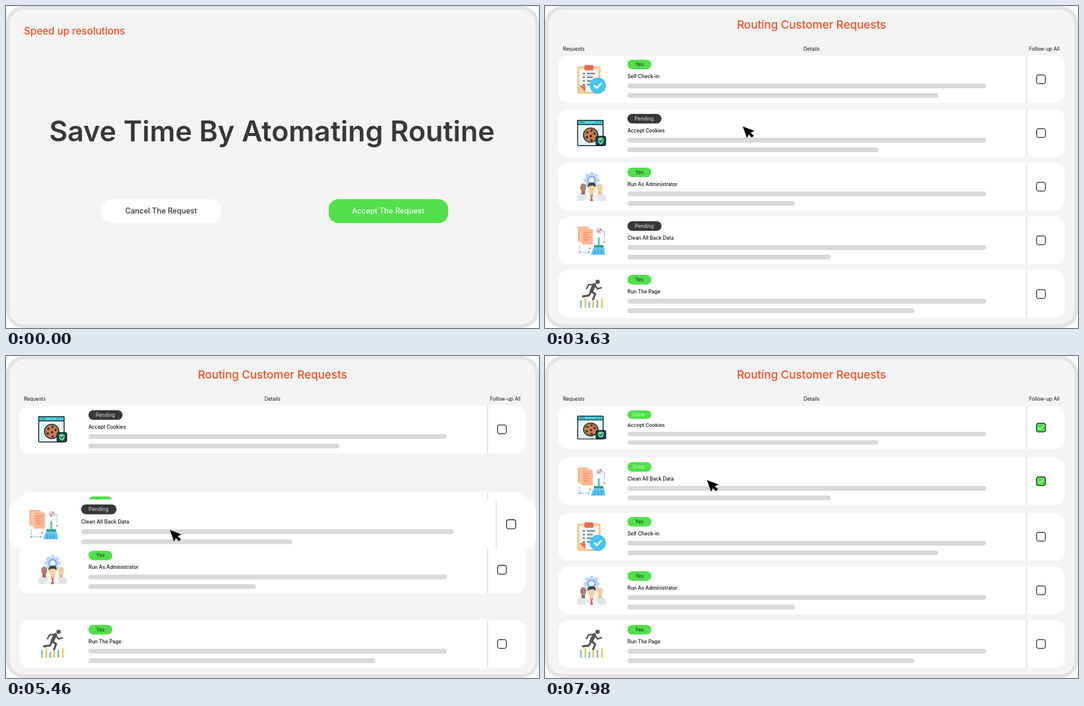
Recreate the animation shown at these times as an HTML page. Size 892 by 540 pixels, loop 8 s.

```html
<!DOCTYPE html>
<html lang="en">
<head>
<meta charset="utf-8">
<title>Routing requests</title>
<style>
html, body { margin: 0; width: 100%; height: 100%; overflow: hidden; background: #fff; }
svg { display: block; width: 892px; height: 540px; font-family: Inter, "Open Sans", sans-serif; }
.mid { text-anchor: middle; }
.small { font-size: 8.3px; fill: #111; }
.orange { fill: #f04e23; font-weight: 500; }
.line { fill: none; stroke-linecap: round; stroke-linejoin: round; }
</style>
</head>
<body>
<svg viewBox="0 0 892 540">
  <rect x="3" y="3" width="886" height="534" rx="27" fill="#f4f4f4" stroke="#e4e4e4" stroke-width="6"/>
  <g id="intro">
    <text x="30" y="48" font-size="16.75" class="orange">Speed up resolutions</text>
    <text x="445" y="227" font-size="47.5" font-weight="600" fill="#38383a" class="mid">Save Time By Atomating Routine</text>
    <rect x="160" y="324" width="200" height="40" rx="16" fill="#fff"/>
    <text x="259.5" y="348" font-size="12.5" font-weight="500" fill="#333" class="mid">Cancel The Request</text>
    <g id="acceptButton">
      <rect x="540" y="324" width="200" height="40" rx="16" fill="#52df4b"/>
      <text x="639.5" y="348" font-size="12.5" font-weight="500" fill="#f0fff0" class="mid">Accept The Request</text>
    </g>
  </g>
  <g id="board">
    <text x="446" y="38" font-size="18.8" class="orange mid">Routing Customer Requests</text>
    <text x="30" y="75" class="small">Requests</text>
    <text x="446" y="75" class="small mid">Details</text>
    <text x="861" y="75" class="small" text-anchor="end">Follow-up All</text>
    <g id="rows"></g>
  </g>
  <path id="cursor" d="M0 0L19.5 7.5 13 10.5 18.5 15.5 15 18.8 10 13.5 7 19.5Z"/>
</svg>
<script>
const $ = id => document.getElementById(id);
const LOOP = 8000, GREEN = [82, 223, 75], DARK = [56, 56, 58];

const rect = (x, y, w, h, fill, rx = 0, more = '') =>
  `<rect x="${x}" y="${y}" width="${w}" height="${h}" rx="${rx}" fill="${fill}" ${more}/>`;
const dot = (x, y, r, fill, more = '') => `<circle cx="${x}" cy="${y}" r="${r}" fill="${fill}" ${more}/>`;
const oval = (x, y, rx, ry, fill) => `<ellipse cx="${x}" cy="${y}" rx="${rx}" ry="${ry}" fill="${fill}"/>`;
const shape = (d, fill) => `<path d="${d}" fill="${fill}"/>`;
const line = (d, color, w, more = '') =>
  `<path class="line" d="${d}" stroke="${color}" stroke-width="${w}" ${more}/>`;
const repeat = (n, draw) => Array.from({ length: n }, (_, i) => draw(i)).join('');

const icons = {
  cookie: () => {
    const edge = 'stroke="#111c22" stroke-width="1.5"';
    return rect(54.7, 18.7, 42.6, 42.6, '#e2fbfd', 1.5, edge) +
      rect(54.7, 18.7, 42.6, 7, '#4fd4da', 1.5, edge) +
      line('M58 22.2H66', '#176a75', 1.3) + repeat(3, i => dot(85 + i * 4, 22.2, 1, '#176a75')) +
      dot(76.5, 43.5, 12, '#c87d50', edge) +
      [[71, 39], [78, 36], [70, 47], [77, 45], [83, 41], [78, 52]].map(([x, y]) => dot(x, y, 2, '#3b2420')).join('') +
      rect(85.5, 45.5, 16, 15.5, '#17495b', 3, edge) +
      shape('M93.5 47.5L98 49V53Q98 57 93.5 59 89 57 89 53V49Z', '#6fe08b') +
      line('M91.2 53L93 55 96 51.3', '#123', 1.3);
  },
  clipboard: () =>
    rect(54, 18, 39, 46, '#f0cb8d', 3) + rect(57.5, 22, 32, 39, '#f1f3f6') +
    rect(66, 16, 15, 9, '#e96a50', 2) +
    repeat(4, i => rect(63, 29 + i * 6.2, 4, 2.6, '#6f8590', 1) + rect(70, 29 + i * 6.2, i % 2 ? 10 : 14, 2.6, '#7b8c96', 1)) +
    shape('M57.5 50.5H67.5V61Z', '#e96a50') + shape('M57.5 50.5V61H67.5Z', '#f0cb8d') +
    dot(88.5, 50.5, 13.5, '#46c5f0') + line('M83 51L87 54.5 94 47', '#fff', 3),
  team: () =>
    repeat(8, i => rect(75, 15.5, 6, 7, '#bcd8fb', 1, `transform="rotate(${i * 45} 78 29)"`)) +
    dot(78, 29, 10.5, '#bcd8fb') + dot(78, 29, 6, '#e9f3ff', 'stroke="#6ea4ee" stroke-width="2"') +
    shape('M54 64V56Q56 52 64 51 72 52 74 64Z', '#dfe6ea') + shape('M82 64Q84 52 92 51 100 52 102 56V64Z', '#dfe6ea') +
    rect(61, 46, 6, 7, '#9c6c5a') + rect(89, 46, 6, 7, '#e8bd8e') +
    oval(64, 41.5, 5, 7, '#b08070') + oval(92, 41.5, 5, 7, '#f2d0a3') +
    shape('M66 64Q67 55 78 53 89 55 90 64Z', '#f3f4f8') + rect(75, 48, 6, 8, '#eab98a') +
    oval(78, 43.5, 5.8, 8, '#f5cfa4') +
    shape('M71.5 42Q70 33 78 33 86 32 84.5 42 83 37.5 78 38.5 73 38 71.5 42Z', '#444247') +
    shape('M76 55H80L79 58 80.5 64H75.5L77 58Z', '#e4574f'),
  broom: () =>
    rect(55, 17, 17, 25, '#fbb38b', 1) + rect(58, 19, 17, 25, '#fdc5a4', 1) + rect(62, 21, 18, 26, '#fdb892', 1) +
    repeat(4, i => line(`M65 ${27 + i * 4}H${i % 2 ? 73 : 76}`, '#e97c5a', 1)) +
    dot(90.5, 24, 4, '#fff', 'stroke="#8b9bb0" stroke-width="1"') + line('M88.5 24L90 26 94 20.5', '#e4574f', 1.3) +
    line('M95 24H99.5V36M58 49V60H73', '#63aee0', 1, 'stroke-dasharray="3 2"') +
    dot(58, 60, 1.5, '#63aee0') + dot(73, 60, 1.5, '#63aee0') +
    rect(88.5, 35, 3, 14, '#57c5a8', 1) + rect(82, 48, 16, 4.5, '#349d94', 1) +
    shape('M81 53H99L101 64H77Z', '#5cc4f5') + line('M84 57L83 63M89 57V63M94 57L95 63', '#2584c8', 1) +
    line('M75 52V55M73.5 53.5H76.5M99 41V44M97.5 42.5H100.5', '#f0685e', 1),
  runner: () =>
    dot(88, 19.5, 3.6, '#575254') + line('M82.5 24.5L77.5 35', '#575254', 6) +
    line('M82 24L73 24.5 69.5 31M84 26L88 31.5 94 29.5', '#575254', 2.6) +
    line('M78 36L84 40 80.5 49M77 36L73.5 42.5 63.5 44', '#575254', 3.4) +
    [[60, 50], [67.5, 47], [74, 53], [80.5, 51.5], [87.5, 50], [95, 47.5]]
      .map(([x, y], i) => rect(x - 1.3, y, 2.8, 63 - y, i % 2 ? '#f2c353' : '#6fc3d0')).join('')
};

const pillText = (label, x, fill) => `<text x="${x}" y="19" font-size="8.3" class="mid ${label}" fill="${fill}">${label}</text>`;

function makeRow(icon, title, barWidth, pending, lift = 0) {
  const g = document.createElementNS('http://www.w3.org/2000/svg', 'g');
  g.innerHTML = rect(22, 0, 848, 80, '#fff', 17) + rect(805, 0, 2, 80, '#e5e5e5') +
    icons[icon]() + `<g transform="translate(0 ${-lift})">` +
    rect(138, 8, pending ? 57 : 40, 16, `rgb(${pending ? DARK : GREEN})`, 8, 'class="pill"') +
    (pending ? pillText('Pending', 166, '#dedede') + pillText('Done', 157, '#c9f7c4') : pillText('Yes', 158, '#1a2a1a')) +
    `<text x="138" y="39" class="small" font-weight="500">${title}</text>` +
    rect(138, 48, 600, 8, '#d9d9d9', 4) + rect(138, 64, barWidth, 8, '#d9d9d9', 4) + '</g>' +
    '<g class="check">' + rect(-7.4, -7.4, 14.8, 14.8, '#fff', 3.5, 'stroke="#222" stroke-width="1.3"') +
    '<g class="tick">' + rect(-7.4, -7.4, 14.8, 14.8, '#52df4b', 3.5, 'stroke="#222" stroke-width="1.3"') +
    line('M-4.5 .2L-1.5 3 4.5 -3', '#d8fbd3', 1.3) + '</g></g>';
  $('rows').append(g);
  const find = name => g.querySelector('.' + name);
  const parts = { pill: find('pill'), pendingText: find('Pending'), doneText: find('Done'), check: find('check'), tick: find('tick') };

  return (top, { grow = 0, done = 0, squash = 1, pop = 0 } = {}) => {
    const scale = 1 + 0.04 * grow, mark = 1 + 0.6 * pop;
    g.setAttribute('transform', `translate(446 ${top + 40 - 3 * done}) scale(${scale} ${scale * squash}) translate(-446 -40)`);
    parts.check.setAttribute('transform', `translate(830 40) scale(${mark} ${mark / squash})`);
    parts.tick.setAttribute('opacity', done);
    if (!pending) return;
    parts.pill.setAttribute('width', mix(57, 40, done));
    parts.pill.setAttribute('fill', `rgb(${DARK.map((c, i) => mix(c, GREEN[i], done))})`);
    parts.pendingText.setAttribute('opacity', Math.max(0, 1 - 2 * done));
    parts.doneText.setAttribute('opacity', Math.max(0, 2 * done - 1));
  };
}

// Dragged rows come last so that they pass over the others.
const selfRow = makeRow('clipboard', 'Self Check-in', 520, false, 1);
const adminRow = makeRow('team', 'Run As Administrator', 280, false);
const runRow = makeRow('runner', 'Run The Page', 480, false);
const cookieRow = makeRow('cookie', 'Accept Cookies', 420, true);
const cleanRow = makeRow('broom', 'Clean All Back Data', 340, true);

const mix = (a, b, p) => a + (b - a) * p;
const span = (t, from, to) => Math.min(1, Math.max(0, (t - from) / (to - from)));
const inOut = p => p < 0.5 ? 4 * p ** 3 : 1 - 4 * (1 - p) ** 3;
const ease = (t, from, to) => inOut(span(t, from, to));
const pulse = (t, from, to) => Math.sin(Math.PI * span(t, from, to)) ** 2;

function cursorAt(t) {
  if (t < 1860) {
    const p = ease(t, 215, 900);
    return [mix(217, 642, p), mix(545, 358, p)];
  }
  if (t < 3630) {
    const rest = 1 - span(t, 1860, 2715);
    return [mix(330, 642, rest ** 1.47), mix(202, 358, rest ** 1.25)];
  }
  if (t < 4080) return [331, mix(202, 123, ease(t, 3630, 4140))];
  if (t < 5190) {
    const p = ease(t, 4080, 4595);
    return [mix(331, 278, p), mix(124, 399, p)];
  }
  const drag = ease(t, 5190, 5690), settle = ease(t, 5690, 5830);
  return [mix(278, 272, drag) - settle, mix(399, 225, drag) - 17 * settle];
}

function draw(t) {
  $('intro').setAttribute('opacity', 1 - span(t, 1860, 2330));
  $('board').setAttribute('opacity', span(t, 2270, 2655));
  $('acceptButton').setAttribute('transform',
    `translate(640 344) scale(${1 + 0.2 * pulse(t, 1030, 1815)}) translate(-640 -344)`);

  const firstDrag = ease(t, 3630, 4140), secondDrag = ease(t, 5190, 5690);
  const cookieDone = ease(t, 6020, 6610), cleanDone = ease(t, 6990, 7560);
  selfRow(83 + 90 * (firstDrag + secondDrag));
  adminRow(263 + 90 * secondDrag);
  runRow(443);
  cookieRow(173 - 90 * firstDrag, {
    grow: span(t, 3630, 3760) - ease(t, 3920, 4250),
    done: cookieDone, squash: 1 - 0.1 * cookieDone, pop: pulse(t, 6780, 7230)
  });
  cleanRow(353 - 180 * secondDrag, {
    grow: span(t, 5050, 5180) - ease(t, 5480, 5815),
    done: cleanDone, pop: pulse(t, 7560, 7990)
  });

  const [x, y] = cursorAt(t);
  const press = pulse(t, 780, 1380) + pulse(t, 2840, 3430) + pulse(t, 4580, 5100);
  $('cursor').setAttribute('transform',
    `translate(${x + 9.5} ${y + 9.5}) scale(${1 + 0.4 * press}) translate(-9.5 -9.5)`);
}

function tick() {
  draw(performance.now() % LOOP);
  requestAnimationFrame(tick);
}
tick();
</script>
</body>
</html>
```
